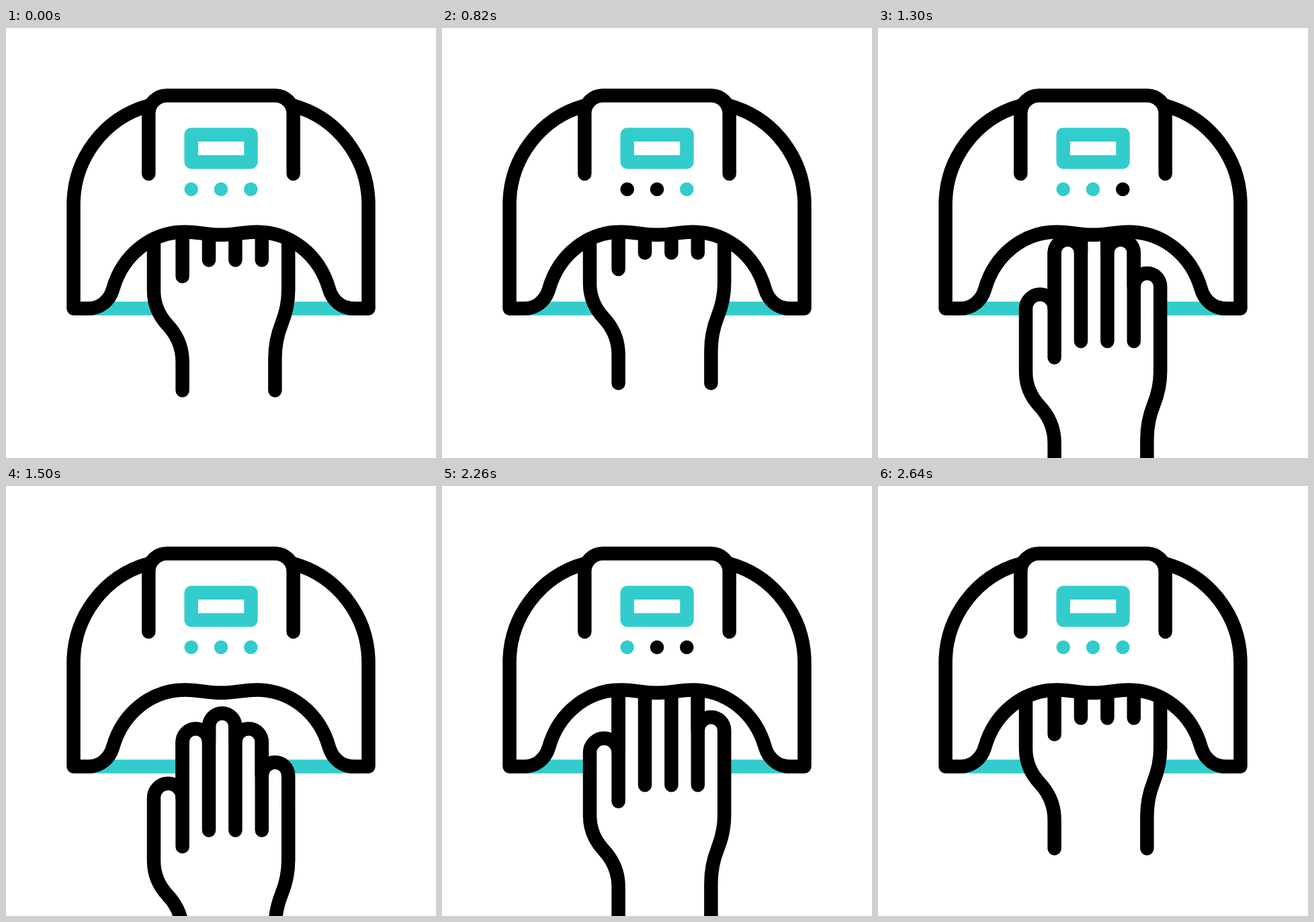
These frames come from a looping animation (640x640 px, 3000 ms). An HTML page:

```html
<!DOCTYPE html>
<html lang="en">
<head>
<meta charset="utf-8">
<title>Nail lamp</title>
<style>
  html, body { margin: 0; width: 100%; height: 100%; overflow: hidden; background: #fff; }
  svg { display: block; width: 100%; height: 100%; }
  path, rect { fill: none; stroke: #000; stroke-width: 20.5; stroke-linecap: round; stroke-linejoin: round; }
  .teal { stroke: #3cc; }
  .solid { fill: #fff; }
  .mask { fill: #fff; stroke: none; }
</style>
</head>
<body>
<svg viewBox="0 0 640 640">
  <defs>
    <path id="shell" style="fill: inherit; stroke: inherit" d="M212 115.7A153 153 0 0 0 100.5 263V417.6H122
      C140 417.6 154 406 159 389C174 336 218 303.4 267 303.4C284 303.4 302 307.8 320 307.8
      C338 307.8 356 303.4 373 303.4C422 303.4 466 336 481 389C486 406 500 417.6 518 417.6H539.5
      V263A153 153 0 0 0 428 115.7"/>
  </defs>
  <path class="teal" d="M124 417.6H516"/>

  <g id="hand">
    <path class="solid" d="M262.6 539.5V497C262.6 476 254.5 457 240.5 442C227.5 428 220 410 220 391V297
      a21.3 21.3 0 0 1 42.6 0V214a19.7 19.7 0 0 1 39.4 0V191a19.7 19.7 0 0 1 39.4 0
      V214a19.7 19.7 0 0 1 39.4 0V264a19.7 19.7 0 0 1 39.4 0V390
      C420.2 409 416.5 425 410 441C403.6 457 400.4 474 400.4 492V539.5"/>
    <path d="M262.6 214V369.7M302 191V345.5M341.4 191V345.5M380.8 214V345.5"/>
  </g>

  <use href="#shell" fill="#fff" stroke="#000"/>
  <path class="solid" d="M212.3 217V127.4a27 27 0 0 1 27-27H400.7a27 27 0 0 1 27 27V217"/>
  <rect class="teal" x="275.7" y="158.7" width="88.8" height="40.8"/>

  <g id="dots">
    <circle cx="275.7" cy="240" r="10.3"/>
    <circle cx="320" cy="240" r="10.3"/>
    <circle cx="364.3" cy="240" r="10.3"/>
  </g>
</svg>
<script>
const LOOP = 3000;
const hand = document.getElementById('hand');
const dots = [...document.querySelectorAll('#dots circle')];

// [time in ms, vertical offset of the hand]
const handKeys = [[0, 0], [600, 0], [900, -13], [1500, 167], [2000, 167], [2600, 0], [LOOP, 0]];

// Start of each run of the lights, and how they follow one another
const runs = [620, 1820], STAGGER = 200, LIT = 420;

const smooth = p => p * p * (3 - 2 * p);

function handOffset(t) {
  const next = handKeys.findIndex(([time]) => time > t);
  const [t0, y0] = handKeys[next - 1], [t1, y1] = handKeys[next];
  return y0 + (y1 - y0) * smooth((t - t0) / (t1 - t0));
}

function isLit(i, t) {
  return runs.some(start => {
    const age = t - start - i * STAGGER;
    return age >= 0 && age < LIT;
  });
}

function draw() {
  const t = performance.now() % LOOP;
  hand.setAttribute('transform', `translate(0 ${handOffset(t)})`);
  dots.forEach((dot, i) => dot.setAttribute('fill', isLit(i, t) ? '#000' : '#3cc'));
  requestAnimationFrame(draw);
}
draw();
</script>
</body>
</html>
```
